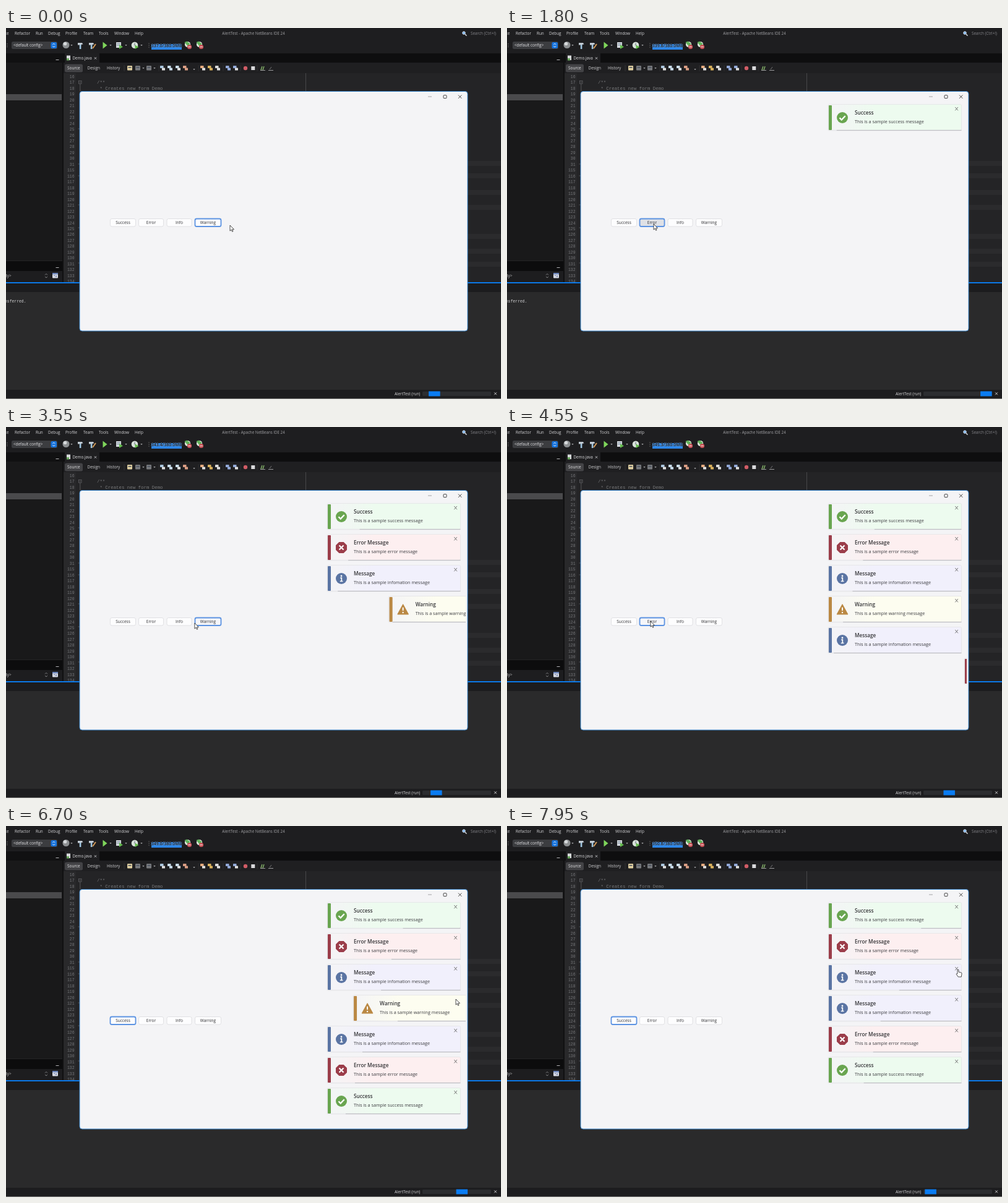
An HTML page that plays this animation: 800x600 px, repeating every 8 s.

```html
<!DOCTYPE html>
<html lang="en">
<head>
<meta charset="utf-8">
<title>Alert demo</title>
<style>
html, body { margin: 0; width: 100%; height: 100%; overflow: hidden; background: #1c1c1e; }
svg { display: block; width: 800px; height: 600px; font-family: "Open Sans", "Noto Sans", sans-serif; }
text { white-space: pre; }
.mono { font-family: "Liberation Mono", "DejaVu Sans Mono", monospace; }
</style>
</head>
<body>
<svg id="stage" viewBox="0 0 800 600" xmlns="http://www.w3.org/2000/svg"></svg>
<script>
const LOOP = 8000;
const SLIDE = 450, TRAVEL = 223, ROW = 50;
const CLOSE_AT = 6576;

const KINDS = {
  success: { title: 'Success', word: 'success', color: '#69a550', tint: '#edfbef' },
  error: { title: 'Error Message', word: 'error', color: '#9b3d4a', tint: '#fdeff0' },
  info: { title: 'Message', word: 'infomation', color: '#5a74a3', tint: '#f1f0fc' },
  warning: { title: 'Warning', word: 'warning', color: '#ba8843', tint: '#fdfdf0' }
};
const BUTTONS = [
  { kind: 'success', label: 'Success', x: 168.5, w: 41 },
  { kind: 'error', label: 'Error', x: 214.5, w: 40 },
  { kind: 'info', label: 'Info', x: 260, w: 40 },
  { kind: 'warning', label: 'Warning', x: 305.5, w: 42 }
];
const CLICKS = [
  [1026, 'success'], [1860, 'error'], [2620, 'info'], [3310, 'warning'],
  [3980, 'info'], [4520, 'error'], [5200, 'success']
].map(([at, kind]) => ({ at, kind }));
const CLOSED = 3;

// time, x, y of the pointer
const PATH = [
  [0, 362, 319], [200, 362, 319], [850, 195, 315], [1250, 195, 315],
  [1650, 237, 317], [1950, 237, 317], [2350, 270, 317], [2700, 270, 317],
  [3080, 322, 317], [3400, 322, 317], [3750, 279, 317], [4050, 279, 317],
  [4330, 232, 314], [4620, 232, 314], [4960, 188, 315], [5250, 188, 315],
  [5650, 477, 307], [6250, 727, 280], [7250, 727, 280], [7700, 729, 232]
];

const clamp = v => Math.max(0, Math.min(1, v));
const ease = v => { v = clamp(v); return v * v * (3 - 2 * v); };
const rect = (x, y, w, h, fill, more = '') =>
  `<rect x="${x}" y="${y}" width="${w}" height="${h}" fill="${fill}" ${more}/>`;
const text = (x, y, str, size, fill, more = '') =>
  `<text x="${x}" y="${y}" font-size="${size}" fill="${fill}" ${more}>${str.replace(/</g, '&lt;')}</text>`;
const line = (d, stroke, width = 1, more = '') =>
  `<path d="${d}" fill="none" stroke="${stroke}" stroke-width="${width}" ${more}/>`;
const shape = (d, fill, more = '') => `<path d="${d}" fill="${fill}" ${more}/>`;
const dot = (x, y, r, fill, more = '') => `<circle cx="${x}" cy="${y}" r="${r}" fill="${fill}" ${more}/>`;
const caret = (x, y) => shape(`M${x - 1.7} ${y - 1}h3.4l-1.7 2z`, '#a9a9ab');

function menuBar() {
  const items = [[-2, 'ce'], [14, 'Refactor'], [48, 'Run'], [68, 'Debug'], [96, 'Profile'],
    [125, 'Team'], [150, 'Tools'], [175, 'Window'], [208, 'Help']];
  return rect(0, 0, 800, 41, '#1e1e20') +
    items.map(([x, s]) => text(x, 11, s, 6.4, '#d2d2d4')).join('') +
    text(400, 11, 'AlertTest - Apache NetBeans IDE 24', 6.2, '#a2a2a5', 'text-anchor="middle"') +
    dot(740, 8, 2.3, '#7ab4ee', 'stroke="#e8eef4" stroke-width=".9"') +
    line('M742 10l2.5 2.6', '#e8eef4', 1.3) +
    text(751, 11, 'Search (Ctrl+I)', 6.3, '#86868a');
}

function hammer(x) {
  return shape(`M${x - 4} 24h7l1.5 2.5h-2.5v1h-6z`, '#c3ccd4') + rect(x - 1.2, 27, 2.6, 7, '#9dc3dd');
}

function badge(x) {
  return dot(x, 26.5, 4.6, '#dfe6dd') + shape(`M${x - 5} 23l4-1.5 5 4-3 5z`, '#62b35c') +
    dot(x + 3, 30.5, 3.6, '#c9545a') + line(`M${x + 1} 30.5h4`, '#f3e2e2');
}

function toolBar() {
  return dot(2, 25.5, .6, '#999') + dot(2, 28, .6, '#999') + dot(2, 30.5, .6, '#999') +
    rect(9, 22, 74, 12, '#3c3d40', 'rx="2.5"') + text(12, 30.4, '<default config>', 6.3, '#e2e2e4') +
    rect(72.5, 23, 9.5, 10, '#1673dd', 'rx="2"') +
    line('M75.3 27l2-2 2 2M75.3 29l2 2 2-2', '#fff', .9) +
    dot(97, 27.5, 5.5, '#8d9092') + dot(95.5, 25.5, 2.8, '#d5d8da') + caret(106, 28) +
    hammer(120) + hammer(138) + line('M140 33l5-7', '#d59b57', 2) +
    shape('M156.5 22.5l7 5.5-7 5.5z', '#7fd65b') + caret(169, 28) +
    rect(178, 23, 8, 9, '#d6dade') + line('M179 25.5h6M179 28h6', '#6d8499', .9) +
    shape('M183 27l6 3.5-6 3.5z', '#63bb4c') + caret(194, 28) +
    dot(208, 27.8, 5.3, '#d9e2da') + line('M208 24.5v3.5l2 1', '#557', .9) +
    shape('M208.5 27.5l6 3.2-6 3.3z', '#63bb4c') + caret(219, 28) +
    [25, 28, 31].map(y => dot(231, y, .6, '#999')).join('') +
    rect(235, 26, 49, 9, '#2c86e8') +
    text(259.5, 30.8, '', 7, '#10161f', 'id="heap" text-anchor="middle" font-weight="600" stroke="#6a9fd8" stroke-width=".8" paint-order="stroke"') +
    badge(293.5) + badge(312.5);
}

function editorBar() {
  const icons = [[200, '#e0cfa0'], [213, '#77797c'], [231, '#77797c'], [253, '#a9c4dc'], [265, '#c9dcea'],
    [278, '#c9dcea'], [290, '#d99d83'], [318, '#e3a87c'], [330, '#d9b15c'], [342, '#d8d8d8'],
    [359, '#92a9d8'], [371, '#92a9d8']];
  return rect(93, 56, 707, 17, '#1f1f21') +
    rect(95, 58.5, 29, 13, '#434346', 'rx="2.5"') +
    text(99, 67.3, 'Source', 6.5, '#e4e4e6') + text(131.5, 67.3, 'Design', 6.4, '#d0d0d2') +
    text(163, 67.3, 'History', 6.4, '#d0d0d2') + line('M191 60v10', '#343437') +
    icons.map(([x, c], i) => i < 3
      ? rect(x - 4, 61, 8, 7.5, c, 'rx="1"') + rect(x - 2.5, 63, 5, 1.5, '#4a5262')
      : rect(x - 4, 61, 5.5, 4, c, 'rx=".6"') + rect(x - 1, 64.5, 5, 4, i % 2 ? '#dedede' : c, 'rx=".6"')).join('') +
    caret(222, 65) + caret(240, 65) + caret(304, 67) +
    [247, 311, 351, 379, 406].map(x => line(`M${x} 60v10`, '#343437', .8)).join('') +
    dot(387, 65, 3.2, '#d05c66') + rect(396.3, 62, 6, 6, '#dadadc') +
    line('M412 68l2-6M415 68l2-6', '#86b46b', 1.4) + line('M411 68.5h8M424 68.5h8', '#a8a8aa', .9) +
    line('M426 67l3-4', '#777', 1);
}

function editor() {
  let s = rect(93, 41, 707, 15, '#0e0e0f') + rect(95, 41, 56, 15, '#1f1f21') +
    rect(98, 44.5, 6, 7.5, '#d8dadc') + rect(98, 49, 4, 3.5, '#68a65c') +
    text(107.5, 51, 'Demo.java', 6.3, '#dcdcde') +
    line('M142.8 47.2l3.4 3.4m0-3.4l-3.4 3.4', '#c8c8ca', .9) +
    editorBar() + rect(93, 73, 707, 338, '#242426') + rect(93, 73, 20, 338, '#29292b');
  [215, 235, 262, 286, 333, 357, 378].forEach(y => s += rect(746, y, 54, 8, '#2b2b2d'));
  for (let i = 0; i < 36; i++) {
    const n = i < 16 ? 16 + i : 99 + i;
    s += text(110.5, (80.8 + i * 9.47).toFixed(2), String(n), 6.4, '#77787b', 'class="mono" text-anchor="end"');
  }
  return s + rect(117.5, 85.5, 4.5, 4.5, 'none', 'stroke="#6a6a6d" stroke-width=".7"') +
    line('M118.7 87.8h2.2M119.8 90v12', '#6a6a6d', .7) +
    [163, 220, 239, 286, 323, 380].map(y => line(`M116.5 ${y}h2.5`, '#66666a', .8)).join('') +
    text(147, 90.3, '/**', 7.4, '#77787a', 'class="mono"') +
    text(151.5, 99.5, '* Creates new form Demo', 7.4, '#77787a', 'class="mono"') +
    line('M484.5 73v30', '#4c4c4f', .9);
}

function sidePanel() {
  return rect(0, 41, 93, 15, '#111112') + line('M80.5 51.5h5', '#b4b4b6') +
    rect(0, 56, 91, 320, '#19191a') + rect(0, 107, 90, 10, '#4a4a4c') +
    rect(91, 56, 2, 355, '#101011') + rect(0, 376, 91, 17, '#0c0c0d') +
    line('M0 376.5h91', '#2b2b2d', .8) + line('M80.5 387.5h5', '#b4b4b6') +
    rect(0, 393, 91, 18, '#1d1d1f') + text(-2, 403.2, 'ity>', 6.3, '#b9b9bb') +
    line('M63 399.5l2-2 2 2M63 402l2 2 2-2', '#9a9a9c', .8) +
    rect(75, 396, 9, 8.5, '#d8dbe4', 'rx="1"') + rect(75, 396, 9, 2.5, '#6d86bb') +
    line('M77 400.5h2M81 400v3', '#5a6fa3', 1.2);
}

function outputPanel() {
  return rect(0, 411, 800, 2, '#0b78e8') + rect(0, 413, 800, 14, '#1c1c1e') +
    rect(0, 427, 800, 158, '#2a2a2b') +
    `<g clip-path="url(#outClip)">${text(-2, 444, 'nsferred.', 6.4, '#d0d0d2', 'id="log" class="mono"')}</g>` +
    rect(0, 585, 800, 14, '#1d1d1f') + rect(0, 599, 800, 1, '#777') +
    text(628, 593.8, 'AlertTest (run)', 6.3, '#d6d6d8') +
    rect(673, 588, 111, 7, '#2c2d30', 'rx="1.5"') +
    rect(673, 587.5, 18.5, 8, '#0a7cf2', 'id="busy"') +
    line('M789 589.3l4 4m0-4l-4 4', '#d6d6d8', .9);
}

function dialog() {
  return rect(119, 102.5, 627, 387.5, '#f4f4f6', 'rx="4" stroke="#3a86cc" stroke-width="1"') +
    line('M682 111h6', '#9a9a9c', .9) +
    rect(707, 108.7, 5, 5, 'none', 'rx="1" stroke="#333" stroke-width=".9"') +
    line('M731 108.5l5.4 5.4m0-5.4l-5.4 5.4', '#333', .9) +
    BUTTONS.map((b, i) => rect(b.x, 308.5, b.w, 12.5, '#fdfdfe', `id="btn${i}" rx="2.5"`) +
      text(b.x + b.w / 2, 317.2, b.label, 6.5, '#303033', 'text-anchor="middle"')).join('');
}

function icon(kind) {
  const c = KINDS[kind].color;
  if (kind === 'success') return dot(542, 145, 9, c) + line('M537.5 145.3l3.2 3.2 6-6.3', '#fff', 2.3);
  if (kind === 'error') return shape('M538.3 136h7.4l5.3 5.3v7.4l-5.3 5.3h-7.4l-5.3-5.3v-7.4z', c) +
    line('M538.5 141.5l7 7m0-7l-7 7', '#fff', 2.2);
  if (kind === 'info') return dot(542, 145, 9, c) + dot(542, 141, 1.4, '#fff') +
    line('M540.3 144.2h2v5M539.8 149.5h4.6', '#fff', 1.7);
  return shape('M542 137l8.6 15.8h-17.2z', c, `stroke="${c}" stroke-width="1.2" stroke-linejoin="round"`) +
    line('M542 141.8v5.2', '#fff', 1.9) + dot(542, 150, 1.2, '#fff');
}

function toast({ kind }, i) {
  const k = KINDS[kind];
  return `<g id="toast${i}">` +
    rect(518, 123.5, 217, 43, '#777', 'rx="3" opacity=".07"') +
    rect(520, 123.5, 214.5, 41.8, `url(#${kind})`, 'rx="2" stroke="#e5e5e8" stroke-width=".8"') +
    rect(520, 125, 5, 40, k.color, 'rx="1"') +
    rect(520, 164.9, 214, 1.2, '#bfbfc4', `id="left${i}"`) + icon(kind) +
    text(562, 139.8, k.title, 8.2, '#343437', 'font-weight="600"') +
    text(562, 153.8, `This is a sample ${k.word} message`, 7.2, '#3c3c40') +
    line('M724.3 128l4.6 5.4m0-5.4l-4.6 5.4', '#666', .9) + '</g>';
}

function pointers() {
  return '<g id="cursor" stroke="#222" stroke-width=".8" stroke-linejoin="round">' +
    shape('M0 0V9.2L2.1 7.2 3.6 10.4 5 9.7 3.6 6.7H6.5z', '#fff', 'id="arrow"') +
    shape('M-1 .6Q0-.8 1 .6V4.2L5 5Q6.2 5.4 6 7L5.2 12H.2L-2.8 7.6Q-2.8 6.2-1 7z', '#fff', 'id="hand"') + '</g>';
}

const tints = Object.entries(KINDS).map(([id, k]) =>
  `<linearGradient id="${id}"><stop offset="0" stop-color="#f4f4f6"/><stop offset=".35" stop-color="${k.tint}"/><stop offset="1" stop-color="${k.tint}"/></linearGradient>`).join('');

document.getElementById('stage').innerHTML =
  `<defs>${tints}<clipPath id="winClip"><rect x="119" y="103" width="624" height="386"/></clipPath>` +
  '<clipPath id="outClip"><rect x="0" y="427" width="120" height="158"/></clipPath></defs>' +
  menuBar() + toolBar() + editor() + sidePanel() + outputPanel() + dialog() +
  `<g clip-path="url(#winClip)">${CLICKS.map(toast).join('')}</g>` + pointers();

const el = id => document.getElementById(id);
const set = (id, attrs) => { for (const a in attrs) el(id).setAttribute(a, attrs[a]); };
const show = (id, on) => set(id, { visibility: on ? 'visible' : 'hidden' });

function pointerAt(t) {
  const i = PATH.findIndex(p => p[0] > t);
  if (i < 0) return PATH[PATH.length - 1].slice(1);
  const [t0, x0, y0] = PATH[Math.max(0, i - 1)], [t1, x1, y1] = PATH[i];
  const u = ease((t - t0) / (t1 - t0));
  return [x0 + (x1 - x0) * u, y0 + (y1 - y0) * u];
}

function drawButtons(t) {
  const pressed = CLICKS.filter(c => t >= c.at - 150).pop();
  const focus = pressed ? pressed.kind : 'warning';
  const [hx, hy] = pointerAt(Math.max(0, t - 200));
  BUTTONS.forEach((b, i) => {
    const on = b.kind === focus;
    const hover = hx > b.x && hx < b.x + b.w && hy > 308 && hy < 321;
    const down = on && pressed && t < pressed.at;
    set('btn' + i, {
      fill: down ? '#dfe1e6' : hover ? '#f5f6fa' : '#fdfdfe',
      stroke: on ? '#5c93e2' : hover ? '#b0b3d6' : '#dedee1',
      'stroke-width': on ? 1.8 : .9
    });
  });
}

function drawToasts(t, x, y) {
  const gone = t >= CLOSE_AT + SLIDE;
  let overClose = false;
  CLICKS.forEach((c, i) => {
    const closing = i === CLOSED ? ease((t - CLOSE_AT) / SLIDE) : 0;
    const shift = TRAVEL * (1 - ease((t - c.at) / SLIDE) + closing);
    const row = i - (gone && i > CLOSED ? 1 : 0);
    const visible = t >= c.at && !(gone && i === CLOSED);
    show('toast' + i, visible);
    set('toast' + i, { transform: `translate(${shift.toFixed(2)} ${row * ROW})` });
    const used = Math.max(5, (t - c.at - 200) * .0222);
    set('left' + i, { x: 520 + used, width: 214.5 - used });
    if (visible && shift < .01 && Math.abs(x - 727) < 5 && Math.abs(y - 131 - row * ROW) < 6) overClose = true;
  });
  return overClose;
}

function draw(t) {
  const [x, y] = pointerAt(t);
  drawButtons(t);
  const hand = drawToasts(t, x, y);
  set('cursor', { transform: `translate(${x.toFixed(2)} ${y.toFixed(2)})` });
  show('arrow', !hand);
  show('hand', hand);

  const phase = (.109 + t / 2030) % 2;
  set('busy', { x: 673 + 92.5 * (phase < 1 ? phase : 2 - phase) });
  set('log', { y: 444 - Math.max(0, t - 2450) * .1 });
  el('heap').textContent = (337 + Math.floor(t / 500) * .92).toFixed(1) + '/380.0MB';
}

const start = performance.now();
function tick() {
  draw((performance.now() - start) % LOOP);
  requestAnimationFrame(tick);
}
draw(0);
requestAnimationFrame(tick);
</script>
</body>
</html>
```
